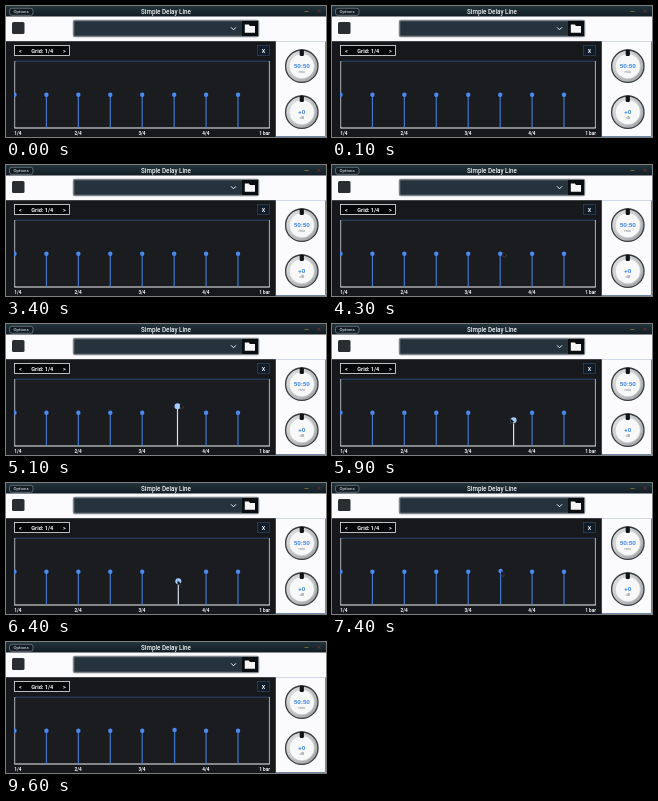
Recreate the animation shown at these times as an HTML page. Size 320 by 131 pixels, loop 9.7 s.

```html
<!DOCTYPE html>
<html lang="en">
<head>
<meta charset="utf-8">
<title>Simple Delay Line</title>
<style>
  html, body { margin: 0; width: 100%; height: 100%; overflow: hidden; background: #17181b; }
  svg { display: block; width: 100vw; height: 100vh; }
  text { font-family: Roboto, "Open Sans", sans-serif; fill: #f2f4f6; }
  .bold { font-weight: 700; }
  .mid { text-anchor: middle; }
  .value { font-size: 6.2px; font-weight: 700; fill: #3f86ee; }
  .unit { font-size: 4px; fill: #777d83; }
</style>
</head>
<body>
<svg viewBox="0 0 320 131" preserveAspectRatio="none">
  <defs>
    <linearGradient id="bar" x1="0" y1="0" x2="0" y2="1">
      <stop offset="0" stop-color="#22343b"/>
      <stop offset="1" stop-color="#121d25"/>
    </linearGradient>
    <linearGradient id="ring" x1="0" y1="0" x2="1" y2="1">
      <stop offset="0" stop-color="#e6e7e8"/>
      <stop offset="1" stop-color="#9b9ea1"/>
    </linearGradient>
    <clipPath id="plot"><rect x="8" y="50" width="257" height="75"/></clipPath>
    <g id="knob">
      <circle r="16.2" fill="url(#ring)" stroke="#3a3d40" stroke-width="1.3"/>
      <circle r="12.6" fill="#f8f8f8" stroke="#c8cacc" stroke-width=".7"/>
      <rect x="-2.1" y="-16.8" width="4.2" height="6.6" rx="1.2" fill="#111416"/>
    </g>
  </defs>

  <!-- title bar -->
  <rect width="320" height="10.5" fill="url(#bar)"/>
  <rect x="3.5" y="2.3" width="23.5" height="7" rx="2.2" fill="#131d25" stroke="#8f989f" stroke-width=".6"/>
  <text class="mid" x="15.2" y="7.4" font-size="4.4">Options</text>
  <text class="mid" x="160" y="7.8" font-size="6.3" font-weight="500">Simple Delay Line</text>
  <path d="M298.5 5.5h4" stroke="#8a7a35" stroke-width=".8"/>
  <path d="M311.5 3.8l3 3m0-3l-3 3" stroke="#7d2b33" stroke-width=".8"/>

  <!-- toolbar -->
  <rect y="10.5" width="320" height="120.5" fill="#fbfbfd"/>
  <rect x="6" y="16" width="12.5" height="12" rx="1.5" fill="#2b2e31"/>
  <rect x="67.5" y="14.5" width="185" height="16" rx="1.5" fill="#25333d" stroke="#7b8288" stroke-width="1.5"/>
  <path d="M225 21.3l2.5 2.5 2.5-2.5" fill="none" stroke="#eef1f3"/>
  <rect x="236" y="15" width="16" height="15" fill="#0b0e10"/>
  <path d="M238.8 18.4h4l1.2 1.5h5v6.8h-10.2z" fill="#f6f6f6"/>

  <!-- right panel edge -->
  <path d="M270 35.5h49.5" stroke="#c9cfe6" stroke-width=".8"/>
  <path d="M270 130.5h49.5V35.5" fill="none" stroke="#6f86a6"/>

  <!-- editor panel -->
  <rect y="35.2" width="269.8" height="95.8" fill="#17181b"/>
  <rect x="8.5" y="39.5" width="55" height="10" fill="#050607" stroke="#e8e8e8" stroke-width=".8"/>
  <text class="bold mid" x="14.3" y="46.5" font-size="5.4">&lt;</text>
  <text class="bold mid" x="36.3" y="46.5" font-size="5.6">Grid: 1/4</text>
  <text class="bold mid" x="58.4" y="46.5" font-size="5.4">&gt;</text>
  <rect x="251.4" y="39.4" width="12.2" height="10.2" fill="#101c2a" stroke="#33475a" stroke-width=".7"/>
  <text class="bold mid" x="257.5" y="46.5" font-size="5.4">X</text>
  <rect x="9" y="55" width="254.5" height="67" fill="#1b1c20"/>
  <path d="M9 55.2H263.5" stroke="#2f4b7c" stroke-width=".9"/>
  <path d="M8.7 55v67M263.4 55v67" stroke="#d3d9e0" stroke-width=".8"/>
  <path d="M8.3 122H263.8" stroke="#f0f2f4"/>
  <g id="taps" clip-path="url(#plot)"></g>
  <g id="labels" class="bold" font-size="4.7"></g>

  <!-- knobs -->
  <use href="#knob" x="295.8" y="60.2"/>
  <use href="#knob" x="295.8" y="106.2"/>
  <g class="mid">
    <text class="value" x="295.8" y="62.4">50:50</text>
    <text class="unit" x="295.8" y="67.3">mix</text>
    <text class="value" x="295.8" y="108">+0</text>
    <text class="unit" x="295.8" y="113">dB</text>
  </g>

  <path id="cursor" d="M0 0v5l1.2-1.1.8 1.8.9-.4-.8-1.7h1.6z" fill="#0a0b0c" stroke="#6d747b" stroke-width=".3"/>
</svg>
<script>
const LOOP = 9700, STEP = 100;
const DRAG_START = 4900, DRAG_END = 7300, REST_Y = 88.8, FLOOR = 121.6;
const BLUE = "#4a8af0", STEM = "#4377cc";
const byId = id => document.getElementById(id);

function add(parent, tag, attrs) {
  const node = document.createElementNS("http://www.w3.org/2000/svg", tag);
  set(node, attrs);
  parent.append(node);
  return node;
}
function set(node, attrs) {
  for (const key in attrs) node.setAttribute(key, attrs[key]);
}

// time, x, y
const tapPath = [
  [4900, 168.3, 88.5], [5100, 171.5, 82.3], [5400, 186, 76.3],
  [5650, 189, 84], [5900, 181.6, 96.3], [6300, 174, 99],
  [6750, 168, 92], [7100, 168.6, 88]
];
const cursorPath = [
  [3400, 212, -8], [3800, 195, 45], [4300, 171, 87], [4500, 169, 88],
  [4900, 169, 88], [5100, 174, 79.5], [5400, 192, 77],
  [5650, 189, 84], [5900, 178.6, 94.5], [6300, 173, 98],
  [6750, 168, 92], [7100, 169, 88], [8100, 169, 88], [8400, 225, -8]
];

// Monotone cubic through keys, so holds stay still.
function along(path, t) {
  const last = path.length - 1;
  if (t <= path[0][0]) return path[0].slice(1);
  if (t >= path[last][0]) return path[last].slice(1);
  const i = path.findIndex(p => p[0] > t) - 1;
  const a = path[i], b = path[i + 1], span = b[0] - a[0], u = (t - a[0]) / span;
  const slope = (k, d) => (path[k + 1][d] - path[k][d]) / (path[k + 1][0] - path[k][0]);
  const tangent = (k, d) => {
    if (k === 0 || k === last) return 0;
    const p = slope(k - 1, d), q = slope(k, d);
    return p * q <= 0 ? 0 : 2 * p * q / (p + q);
  };
  return [1, 2].map(d =>
    (1 + 2 * u) * (1 - u) ** 2 * a[d] + u * (1 - u) ** 2 * span * tangent(i, d) +
    u * u * (3 - 2 * u) * b[d] + u * u * (u - 1) * span * tangent(i + 1, d));
}

const taps = Array.from({ length: 8 }, (_, i) => {
  const tap = {
    stem: add(byId("taps"), "line", { "stroke-width": 1.2 }),
    dot: add(byId("taps"), "circle", {})
  };
  place(tap, 8.5 + i * 31.93, REST_Y, false);
  if (i === 0) set(tap.stem, { stroke: "none" });
  return tap;
});

["1/4", "2/4", "3/4", "4/4", "1 bar"].forEach((label, i) => {
  const anchor = i === 0 ? "start" : i === 4 ? "end" : "middle";
  add(byId("labels"), "text", {
    x: i === 4 ? 264 : 8.2 + i * 63.9, y: 128.6, "text-anchor": anchor
  }).textContent = label;
});

function place(tap, x, y, held) {
  set(tap.stem, { x1: x, x2: x, y1: y, y2: FLOOR, stroke: held ? "#d5e0f0" : STEM });
  set(tap.dot, { cx: x, cy: y, r: held ? 3 : 2.2, fill: held ? "#a5cbfa" : BLUE });
}

function draw(time) {
  const t = Math.floor(time % LOOP / STEP) * STEP;
  const held = t >= DRAG_START && t < DRAG_END;
  const [x, y] = t < DRAG_START ? [168.2, REST_Y] : along(tapPath, t);
  place(taps[5], x, y, held);
  const [cx, cy] = along(cursorPath, t);
  set(byId("cursor"), {
    transform: `translate(${cx} ${cy})`,
    visibility: t > 3400 && t < 8400 ? "visible" : "hidden"
  });
}

const start = performance.now();
function tick() {
  draw(performance.now() - start);
  requestAnimationFrame(tick);
}
draw(0);
requestAnimationFrame(tick);
</script>
</body>
</html>
```
